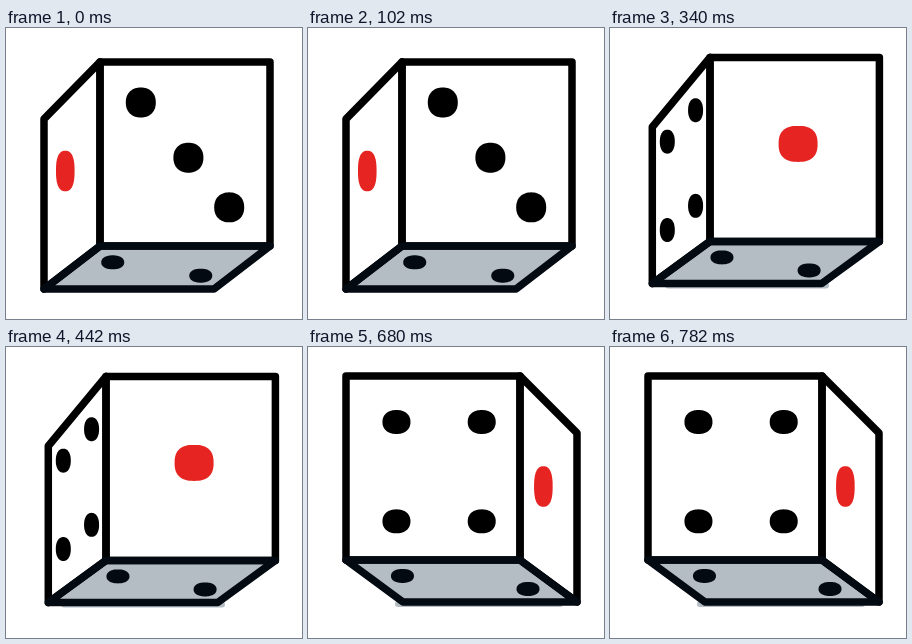
Write an HTML page with a canvas that moves like this. It is 296 px wide and 291 px high and loops after 0.85 s.

```html
<!DOCTYPE html>
<html lang="en">
<head>
<meta charset="utf-8">
<title>Rolling die</title>
<style>
  html, body { margin: 0; width: 100%; height: 100%; overflow: hidden; background: #fff; }
  canvas { display: block; }
</style>
</head>
<body>
<canvas id="stage"></canvas>
<script>
const W = 296, H = 291, STEP = 170, LINE = 7.5;
const INK = '#000', NAVY = '#030a12', RED = '#e62421', SHADE = '#b4bcc4';

// The three upright edges of each pose as [x, top, bottom], the values on the
// left and right faces, and where the red pip sits on its face.
const poses = [
  { left: [38, 91, 261], mid: [94, 34, 218], right: [264, 34, 218], values: [1, 3], one: [.38, .42] },
  { left: [42, 58, 228], mid: [197.5, 29, 200], right: [266, 72, 228], values: [1, 3], one: [.48, .46],
    smudge: [142, 153], speck: true },
  { left: [42.3, 99, 255.5], mid: [100, 29.4, 213.4], right: [269.4, 29.4, 213.4], values: [4, 1], one: [.52, .47],
    smudge: [58, 216] },
  { left: [42, 68, 222], mid: [107.6, 25, 195], right: [256.7, 52, 222], values: [4, 1], one: [.55, .48] },
  { left: [38, 29, 213], mid: [212, 29, 213], right: [269, 86, 255], values: [4, 1], one: [.41, .49],
    smudge: [90, 252] }
];

// Pip radii on the broad and on the narrow face
const sizes = {
  1: { broad: [19.5, 18], narrow: [9.3, 20.3] },
  3: { broad: [15, 15], narrow: [8, 10.5] },
  4: { broad: [14, 12], narrow: [7.5, 12] }
};
const layouts = {
  3: [[.24, .22], [.52, .52], [.76, .79]],
  4: [[.29, .25], [.78, .25], [.29, .79], [.78, .79]]
};

const canvas = document.getElementById('stage');
const ctx = canvas.getContext('2d');
const ratio = window.devicePixelRatio || 1;
canvas.width = W * ratio;
canvas.height = H * ratio;
canvas.style.width = W + 'px';
canvas.style.height = H + 'px';

const mix = (a, b, t) => a + (b - a) * t;
const between = (p, q, t) => [mix(p[0], q[0], t), mix(p[1], q[1], t)];

// Point at (u, v) of a quad listed clockwise from its top left corner
const onQuad = ([a, b, c, d], u, v) => between(between(a, b, u), between(d, c, u), v);

function trace(points) {
  ctx.beginPath();
  points.forEach(p => ctx.lineTo(...p));
  ctx.closePath();
}

function outline(points, color) {
  trace(points);
  ctx.strokeStyle = color;
  ctx.lineWidth = LINE;
  ctx.stroke();
}

// Slightly squared ellipse
function blob([x, y], [rx, ry], color, power = 2.2) {
  const curve = n => Math.sign(n) * Math.abs(n) ** (2 / power);
  trace(Array.from({ length: 72 }, (_, i) => {
    const a = i * Math.PI / 36;
    return [x + rx * curve(Math.cos(a)), y + ry * curve(Math.sin(a))];
  }));
  ctx.fillStyle = color;
  ctx.fill();
}

function sideFace(a, b) {
  return [[a[0], a[1]], [b[0], b[1]], [b[0], b[2]], [a[0], a[2]]];
}

// Foreshortened faces carry their pips a little higher and further out
function drawPips(quad, value, broad, outward, one) {
  const size = sizes[value][broad ? 'broad' : 'narrow'];
  if (value === 1) return blob(onQuad(quad, ...one), size, RED, 2.5);
  const shift = broad ? 0 : .03 * outward, lift = broad ? 0 : .05;
  layouts[value].forEach(([u, v]) => blob(onQuad(quad, u + shift, v - lift), size, INK));
}

function draw({ left, mid, right, values, one, smudge, speck }) {
  const l = [left[0], left[2]], m = [mid[0], mid[2]], r = [right[0], right[2]];
  const angled = l[1] !== m[1] && r[1] !== m[1];
  const broadLeft = mid[0] - left[0] > right[0] - mid[0];

  // The near corner completes a parallelogram, pulled inwards on a corner view
  const foot = [
    mix(l[0] + r[0] - m[0], (l[0] + r[0]) / 2, angled ? .7 : 0),
    l[1] + r[1] - m[1]
  ];
  const base = broadLeft ? [l, m, r, foot] : [m, r, foot, l];
  const faces = [sideFace(left, mid), sideFace(mid, right)];

  ctx.setTransform(ratio, 0, 0, ratio, 0, 0);
  ctx.fillStyle = '#fff';
  ctx.fillRect(0, 0, W, H);
  ctx.save();
  ctx.beginPath();
  ctx.rect(0, 24, W, H);
  ctx.clip();
  ctx.lineJoin = ctx.lineCap = 'round';

  if (smudge) {
    ctx.beginPath();
    smudge.forEach(x => ctx.lineTo(x, foot[1] + 2));
    ctx.strokeStyle = SHADE;
    ctx.lineWidth = 6;
    ctx.stroke();
  }
  trace(base);
  ctx.fillStyle = SHADE;
  ctx.fill();
  faces.forEach(f => outline(f, INK));
  outline(base, NAVY);

  drawPips(faces[0], values[0], broadLeft, -1, one);
  drawPips(faces[1], values[1], !broadLeft, 1, one);
  const depths = angled ? [.68, .33] : [.38, .69];
  depths.forEach((v, i) => blob(onQuad(base, .2 + .62 * i, v), [11.5, 7], NAVY));
  if (speck) blob([293.5, 184], [1, 7], '#222');
  ctx.restore();
}

const start = performance.now();
let shown = -1;
function tick() {
  const i = Math.floor((performance.now() - start) / STEP) % poses.length;
  if (i !== shown) draw(poses[shown = i]);
  requestAnimationFrame(tick);
}
tick();
</script>
</body>
</html>
```
